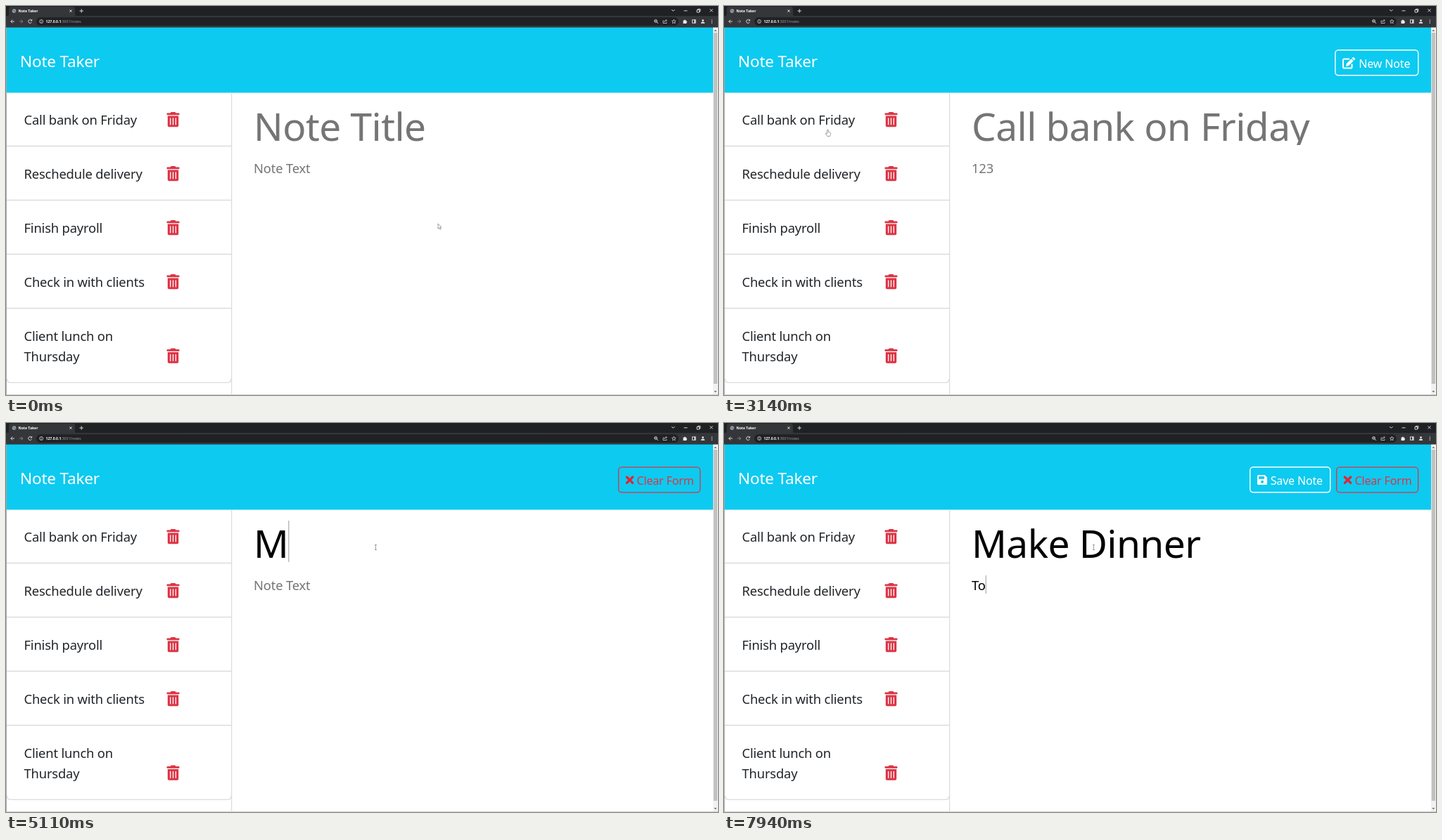
An HTML page for the animation above (8000 ms loop, 1012 by 554 pixels).

```html
<!DOCTYPE html>
<html lang="en">
<head>
<meta charset="utf-8">
<title>Note Taker</title>
<style>
  html, body { margin: 0; width: 100%; height: 100%; overflow: hidden; background: #fff; }
  svg { display: block; }
  text { font-family: "Noto Sans", sans-serif; letter-spacing: -.01em; white-space: pre; }
  .tiny { font-size: 5.1px; fill: #fff; letter-spacing: 0; }
  .brand { font-size: 22.6px; fill: #fff; }
  .item { font-size: 18.4px; fill: #212529; }
  .title { font-size: 55px; }
  .button text { font-size: 16px; }
  .icons { fill: none; stroke: #e4e5e7; stroke-width: .9; }
  .rule { fill: none; stroke: #dcdcdc; stroke-width: 1.3; }
</style>
</head>
<body>
<svg width="1012" height="554" viewBox="0 0 1012 554">
  <defs>
    <clipPath id="titleBox"><rect x="350" y="138" width="640" height="60"/></clipPath>
    <g id="trash" fill="#dc3545">
      <path d="M0 2.2q0-.8.8-.8H5L5.6.5Q5.9 0 6.5 0h5q.6 0 .9.5l.6.9h4.2q.8 0 .8.8v1.3q0 .7-.8.7H.8Q0 4.2 0 3.5z"/>
      <path d="M1.3 5.4h15.4v13.8q0 2-2 2H3.3q-2 0-2-2z"/>
      <path d="M5.2 9v8.8M9 9v8.8M12.8 9v8.8" stroke="#fff" stroke-width="1.3" stroke-linecap="round"/>
    </g>
  </defs>

  <!-- Browser frame -->
  <rect width="1012" height="31" fill="#202124"/>
  <path d="M2 14q2 0 2-2V4q0-3 3-3h88q3 0 3 3v8q0 2 2 2h912v16.5H0V14z" fill="#35363a"/>
  <rect x="43" y="16.3" width="913" height="11.6" rx="5.8" fill="#202124"/>
  <circle cx="11.5" cy="7" r="2.8" fill="#9aa0a6"/>
  <path d="M9.6 6l2 1 2 1.2" stroke="#505358" fill="none"/>
  <text class="tiny" x="17.5" y="8.9" font-weight="600">Note Taker</text>
  <text class="tiny" x="56.5" y="23.9"><tspan font-weight="600">127.0.0.1</tspan><tspan fill="#9aa0a6">:3001/notes</tspan></text>
  <g class="icons">
    <path d="M90.3 5.3l3.4 3.4m0-3.4l-3.4 3.4M104.5 7h5.4M107.2 4.3v5.4"/>
    <path d="M946 5l2.3 2.3L950.600 5M963.5 6.800h5M982 5.500h3.500v3.500H982zM983.300 5.300V4.300h3.500v3.500h-1M1000.500 4.300l4 4m0-4l-4 4"/>
    <path d="M12 22H6.800m2.500-2.500L6.800 22l2.500 2.500"/>
    <path d="M19 22h5m-2.500-2.500L24 22l-2.500 2.500" stroke="#85878a"/>
    <path d="M36.300 20.500a2.500 2.500 0 1 0 .2 2.500M36.700 19v2h-2"/>
    <path d="M50.200 21.600v2.200M50.200 20.200v.8" stroke-width=".7"/>
    <circle cx="50.200" cy="22" r="2.500" stroke-width=".7"/>
    <circle cx="923.500" cy="21.400" r="1.900"/><path d="M925 22.900l2 2M922.500 21.400h2"/>
    <path d="M935.500 21h-1.500v3.500h5V23M935.800 23q0-2.500 3.200-2.500m-1.300-1.500l1.500 1.500-1.500 1.500" stroke-width=".7"/>
    <path d="M949.300 19.200l.8 1.900 2 .2-1.500 1.400.5 2-1.800-1.100-1.800 1.100.5-2-1.500-1.400 2-.2z" stroke-width=".7"/>
    <rect x="975.500" y="19.800" width="4.600" height="4.400"/>
    <path d="M979 19.500v5" stroke-width="1.600"/>
  </g>
  <g fill="#e8eaed">
    <path d="M962.500 20.500h1.400a.9.9 0 0 1 1.800 0h1.500v1.400a.9.9 0 0 1 0 1.800v1.400h-4.700z"/>
    <circle cx="990.500" cy="20.600" r="1.400"/><path d="M987.800 24.700q0-2.200 2.700-2.200t2.700 2.200z"/>
    <circle cx="1003.300" cy="19.800" r=".65"/><circle cx="1003.300" cy="22" r=".65"/><circle cx="1003.300" cy="24.200" r=".65"/>
  </g>

  <!-- Page -->
  <rect x="0" y="30.500" width="1005" height="93" fill="#0dcaf0"/>
  <text class="brand" x="20" y="87">Note Taker</text>
  <rect x="1005" y="30.500" width="7" height="523.500" fill="#f1f1f1"/>
  <rect x="1005.700" y="38" width="5.300" height="500" fill="#c1c1c1"/>
  <path d="M1006.300 36l2-2.400 2 2.400zM1006.300 548l2 2.400 2-2.400z" fill="#777"/>
  <path d="M.5 31V554" stroke="#a5a8ab"/>
  <path d="M0 553.600H1012" stroke="#c5c5c5" stroke-width=".8"/>
  <path class="rule" d="M320.600 124V554M1 199.500H320M1 276.500H320M1 353.500H320M1 430.500H320M1.500 531q0 5.300 5 5.300H315q5 0 5-5.300"/>
  <g id="list"></g>

  <!-- Form -->
  <g clip-path="url(#titleBox)"><text id="title" class="title" x="352" y="192"></text></g>
  <text id="body" class="item" x="352" y="238"></text>
  <path id="caret" stroke="#999" stroke-width="1"/>

  <!-- Header buttons -->
  <g id="newNote" class="button">
    <rect x="868.800" y="62.800" width="118" height="36" rx="4.500" stroke="#fff" stroke-width="1.400"/>
    <g id="newLabel">
      <path d="M889 75.500h-7.500q-1.500 0-1.500 1.500v10q0 1.500 1.500 1.500h9.500q1.500 0 1.500-1.500v-4.500" fill="none" stroke="currentColor" stroke-width="2"/>
      <path d="M884.200 85.800l.4-3.500 7-7 3 3-7 7zM892.400 74.500l1.300-1.300q.8-.8 1.600 0l1.500 1.500q.8.800 0 1.600l-1.300 1.300z" fill="currentColor"/>
      <text x="902.300" y="87.500" fill="currentColor">New Note</text>
    </g>
  </g>
  <g id="clearForm" class="button">
    <rect x="870.600" y="62.800" width="116" height="36" rx="4.500" fill="none" stroke="#dc3545" stroke-width="1.300"/>
    <path d="M882.300 77l8.400 8.400m0-8.400l-8.400 8.400" stroke="#e02536" stroke-width="3.200" stroke-linecap="round"/>
    <text x="896.500" y="87.500" fill="#dc3545">Clear Form</text>
  </g>
  <g id="saveNote" class="button">
    <rect x="747.700" y="62.800" width="114" height="36" rx="4.500" fill="none" stroke="#fff" stroke-width="1.400"/>
    <path fill-rule="evenodd" d="M759.500 74h9l3.500 3.500v9q0 1.500-1.500 1.500h-11q-1.500 0-1.500-1.500v-11q0-1.500 1.500-1.500zM760 76v3.800h8V76zM765 81.800a2 2 0 1 0 .01 0z" fill="#fff"/>
    <text x="776.700" y="87.500" fill="#fff">Save Note</text>
  </g>

  <!-- Pointer -->
  <circle id="click" r="4.500" fill="#f2ee00" opacity=".85"/>
  <g id="arrow"><path d="M0 0v7.300l1.700-1.500 1.200 2.500 1.100-.5-1.100-2.500h2.200z" fill="#fff" stroke="#777" stroke-width=".7"/></g>
  <g id="hand"><path d="M-.8.600q.8-1.200 1.600 0v3.200l2.400.5q1 .3 1 1.300l-.5 2.800-.7 1.400H-.6L-3 6.300q-.3-1 .8-1l1.400.9z" fill="#fff" stroke="#777" stroke-width=".7"/></g>
  <g id="beam"><path d="M-1.500-3.500h3M0-3.500v7M-1.500 3.500h3" fill="none" stroke="#888" stroke-width=".8"/></g>
</svg>
<script>
const $ = id => document.getElementById(id);
const show = (id, on) => { $(id).style.display = on ? '' : 'none'; };
const clamp = v => Math.max(0, Math.min(1, v));
const smooth = v => v * v * (3 - 2 * v);
const LOOP = 8000;

const notes = [['Call bank on Friday'], ['Reschedule delivery'], ['Finish payroll'],
  ['Check in with clients'], ['Client lunch on', 'Thursday']];
$('list').innerHTML = notes.map((lines, row) => {
  const y = 169 + 77 * row;
  const bin = y - 18 + 28.5 * (lines.length - 1);
  return lines.map((line, i) => `<text class="item" x="25.5" y="${y + 28.5 * i}">${line}</text>`).join('') +
    `<use href="#trash" x="228.500" y="${bin}"/>`;
}).join('');

const titleText = 'Make Dinner';
const titleKeys = [5110, 5240, 5450, 5580, 5710, 5990, 6120, 6250, 6460, 6720, 6850];
const bodyText = 'To';
const bodyKeys = [7660, 7940];
const typed = (text, keys, t) => text.slice(0, keys.filter(k => k <= t).length);

// Bezier curve of any degree, by repeated interpolation.
function curve(points, u) {
  while (points.length > 1)
    points = points.slice(1).map((p, i) => p.map((v, k) => points[i][k] * (1 - u) + v * u));
  return points[0];
}

const moves = [
  { start: 1090, step: 70, count: 12, path: [[614, 310], [450, 510], [200, 4], [133, 167]] },
  { start: 3140, step: 68.100, count: 12, path: [[133, 167], [500, 395], [928, 82]] },
  { start: 4840, step: 70, count: 2, path: [[928, 82], [525.500, 177]] },
];

function pointerAt(t) {
  const move = moves.filter(m => t >= m.start).pop();
  if (!move) return moves[0].path[0];
  const done = Math.floor((t - move.start) / move.step) + 1;
  return curve(move.path, smooth(clamp(done / move.count)));
}

function drawPointer(t, hasButton) {
  const [x, y] = pointerAt(t);
  const overList = x < 320 && y > 124;
  const overButton = hasButton && x > 868 && y > 62 && y < 99;
  const overField = x > 345 && y > 139 && y < 300;
  const kind = overList || overButton ? 'hand' : overField ? 'beam' : 'arrow';
  for (const id of ['hand', 'beam', 'arrow']) show(id, id === kind);
  $(kind).setAttribute('transform', `translate(${x} ${y})`);
  show('click', (t >= 2200 && t < 2270) || (t >= 4560 && t < 4630));
  $('click').setAttribute('transform', `translate(${x} ${y + 2.500})`);
}

function setText(id, text, color) {
  $(id).textContent = text;
  $(id).setAttribute('fill', color);
  $(id).style.fill = color;
}

function drawForm(t, viewing) {
  const title = typed(titleText, titleKeys, t);
  const body = typed(bodyText, bodyKeys, t);
  const grey = '#757575';
  setText('title', viewing ? notes[0][0] : title || 'Note Title', title ? '#000' : grey);
  setText('body', viewing ? '123' : body || 'Note Text', body ? '#000' : grey);

  const inBody = t >= 7190;
  const width = inBody ? (body && $('body').getComputedTextLength()) : $('title').getComputedTextLength();
  const x = 352.500 + Number(width);
  show('caret', title);
  $('caret').setAttribute('d', inBody ? `M${x} 217V243` : `M${x} 139V198`);
}

function draw(t) {
  const viewing = t >= 2270 && t < 4630;
  drawForm(t, viewing);

  const hover = smooth(clamp((t - 3880) / 160));
  const shade = Math.round(255 * (1 - hover));
  show('newNote', viewing);
  $('newNote').firstElementChild.setAttribute('fill', `rgba(248,249,250,${hover})`);
  $('newLabel').style.color = `rgb(${shade},${shade},${shade})`;
  show('clearForm', t >= titleKeys[0]);
  show('saveNote', t >= 7730);

  drawPointer(t, viewing);
}

function frame() {
  draw(performance.now() % LOOP);
  requestAnimationFrame(frame);
}
frame();
</script>
</body>
</html>
```
